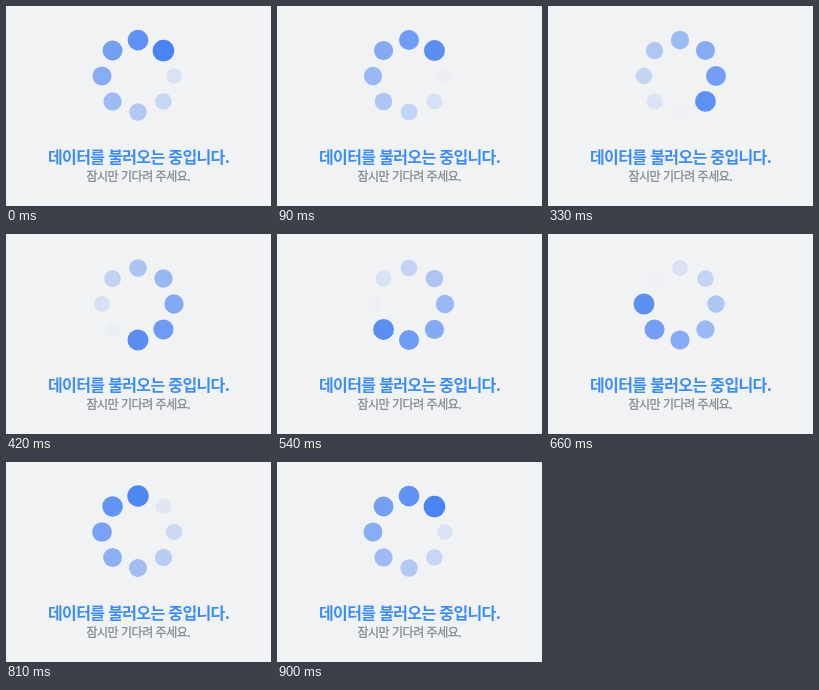
Animation of 265x200 px, one loop 930 ms. Source, as an HTML page:

```html
<!DOCTYPE html>
<html lang="ko">
<head>
<meta charset="utf-8">
<title>로딩</title>
<style>
  html, body { margin: 0; width: 100%; height: 100%; overflow: hidden; background: #f1f2f4; }
  svg { display: block; width: 100vw; height: 100vh; }
  text {
    font-family: "Noto Sans CJK KR", "Noto Sans CJK", "Noto Sans KR", "Noto Sans CJK JP", sans-serif;
    letter-spacing: -.04em;
  }
  .title { font-size: 16px; font-weight: 700; fill: #3a8cfa; }
  .note { font-size: 12px; fill: #858992; stroke: #858992; stroke-width: .3px; }
</style>
</head>
<body>
<svg viewBox="0 0 265 200">
  <rect width="265" height="200" fill="#f1f2f4"/>
  <g id="dots" fill="#4a83f3"></g>
  <text class="title" x="42" y="157">데이터를 불러오는 중입니다.</text>
  <text class="note" x="80.5" y="175">잠시만 기다려 주세요.</text>
</svg>
<script>
  const COUNT = 8, TICK = 30, TICKS = 31, TURN = 30;
  const group = document.getElementById('dots');

  const dots = Array.from({ length: COUNT }, (_, i) => {
    const dot = document.createElementNS('http://www.w3.org/2000/svg', 'circle');
    const angle = (i - 1) * Math.PI / 4;
    dot.setAttribute('cx', 132 + 36 * Math.cos(angle));
    dot.setAttribute('cy', 70 + 36 * Math.sin(angle));
    group.appendChild(dot);
    return dot;
  });

  // Each dot lights up in turn, then fades and shrinks over one lap.
  function draw(ms) {
    const lap = Math.floor(ms / TICK) % TICKS % TURN / TURN;
    dots.forEach((dot, i) => {
      const age = (lap - i / COUNT + 1) % 1;
      dot.setAttribute('r', 10.8 - 3.4 * age);
      dot.setAttribute('opacity', 1 - age);
    });
  }

  let start;
  function frame(now) {
    start ??= now;
    draw(now - start);
    requestAnimationFrame(frame);
  }
  draw(0);
  requestAnimationFrame(frame);
</script>
</body>
</html>
```
